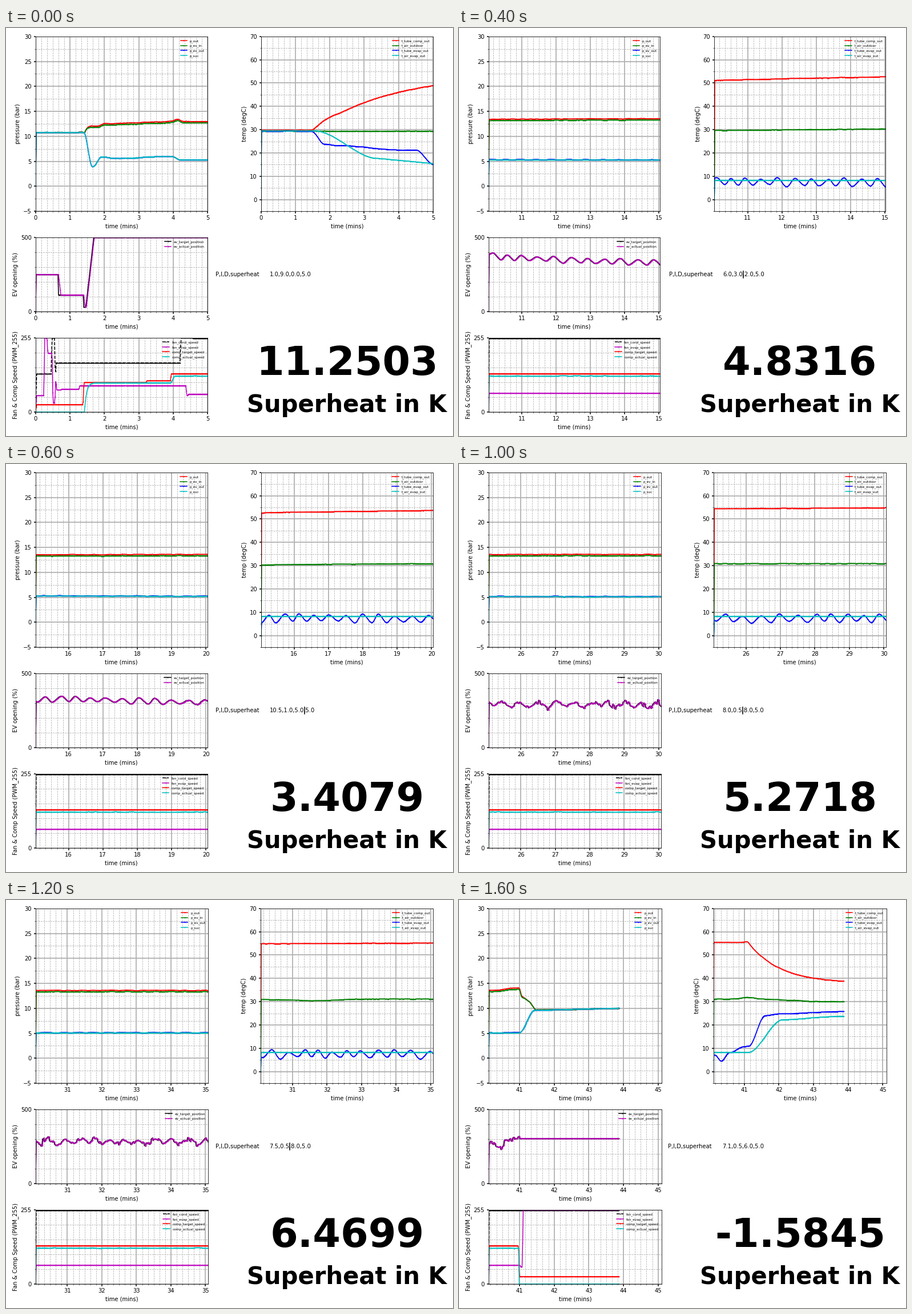
Animation of 783x715 px, one loop 1.8 s. Source, as a matplotlib script:

```python
import numpy as np
import matplotlib.pyplot as plt
from matplotlib.animation import FuncAnimation
from matplotlib.ticker import MultipleLocator

W, H, DPI = 783, 715, 72
SPAN, STRIDE, END = 5.0, 5.0134, 43.89      # window, step and log end, minutes
STOP = 41.0                                 # the compressor shuts down here
# (superheat, controller settings, caret index)
READINGS = [("11.2503", "1.0,9.0,0.0,5.0", None),
            ("7.4167", "1.5,9.0,0.0,5.0", 3),
            ("4.8316", "6.0,3.0,2.0,5.0", 7),
            ("3.4079", "10.5,1.0,5.0,5.0", 12),
            ("5.9240", "8.5,1.0,8.0,5.0", 5),
            ("5.2718", "8.0,0.5,8.0,5.0", 7),
            ("6.4699", "7.5,0.5,8.0,5.0", 7),
            ("4.6053", "7.1,0.5,6.0,5.0", None),
            ("-1.5845", "7.1,0.5,6.0,5.0", None)]

plt.rcParams.update({"font.family": "DejaVu Sans", "font.size": 10})


# ---------- building blocks ----------
def line(t, a, b):
    return np.clip((t - a) / (b - a), 0, 1)


def ease(t, a, b):
    s = line(t, a, b)
    return s * s * (3 - 2 * s)


def rise(t, start, tau):
    return 1 - np.exp(-np.maximum(t - start, 0) / tau)


def bump(t, center, width):
    return np.exp(-((t - center) / width) ** 2)


def keys(t, pairs, eased=False):
    """Join (time, value) pairs with straight or eased segments."""
    x, y = np.array(pairs, float).T
    if not eased:
        return np.interp(t, x, y)
    i = np.clip(np.searchsorted(x, t, "right") - 1, 0, len(x) - 2)
    return y[i] + (y[i + 1] - y[i]) * ease(t, x[i], x[i + 1])


def levels(t, pairs, ramp=.025):
    """Hold each level from its start time, after a short ramp."""
    out, last = 0 * t, 0
    for start, level in pairs:
        out = out + (level - last) * line(t, start, start + ramp)
        last = level
    return out


def swings():
    """Turning points of the evaporator temperature while it hunts."""
    rng = np.random.default_rng(4)
    t, high, out = 6.23, False, []
    while t < 40:
        if t < 9.8:
            out.append((t, 11.4 if high else 5.4))
            t += .43
        else:
            out.append((t, (8.9 if high else 5.9) + rng.uniform(-.6, .6)))
            t += rng.uniform(.17, .29)
        high = not high
    return out


TUBE = ([(0, 29.4), (1.46, 29.4), (1.85, 23.8), (2.2, 23.2), (4.2, 21.2),
         (4.5, 21.3), (5.02, 15.1), (5.5, 11.3), (5.7, 10.9)] + swings()
        + [(40.15, 7.1), (40.33, 4.5), (40.58, 8.3), (41, 10.7), (41.13, 11),
           (41.6, 24), (42, 24.8), (43.9, 25.8)])


def tube_temp(t):
    return keys(t, TUBE, eased=True)


# ---------- traces ----------
def pressures(t, rough):
    high = (10.8 + 1.3 * rise(t, 1.43, .06) + .4 * ease(t, 1.8, 2)
            + .5 * line(t, 2, 4) + .45 * bump(t, 4.12, .12)
            + .6 * rise(t, 5, 4) + .5 * ease(t, 40.2, STOP))
    fall = keys(t, [(41, 14.1), (41.06, 12.5), (41.3, 11.2), (41.46, 9.65),
                    (43.9, 10.05)])
    high = np.where(t < STOP, high, fall) + rough(.03)
    drop = .27 * ease(t, 1.43, 1.6) * (1 - ease(t, STOP, 41.2))

    hunting = (t > 5.8) & (t < 10)
    low = (10.8 - 6.85 * ease(t, 1.40, 1.65) + 1.95 * ease(t, 1.67, 1.92)
           - .3 * ease(t, 1.92, 2.3) + .35 * ease(t, 2.5, 3.6)
           - .65 * ease(t, 3.97, 4.2) - .2 * ease(t, 8, 35)
           + .2 * hunting * np.cos(2 * np.pi * (t - 6.87) / .88)
           + 4.5 * ease(t, 40.99, 41.43) + .45 * line(t, 41.4, 43.9))
    low = low + rough(.015)
    steady = (t > 10) & (t < STOP)
    ev_out = low + steady * np.clip(.03 * (tube_temp(t) - 6), 0, .12)
    return [high, high - drop, ev_out, low]


def temperatures(t, rough):
    comp = np.where(t < 5, 29.8 + 24 * rise(t, 1.5, 2.2) + .8 * bump(t, 1.9, .3),
                    48.9 + 6.9 * rise(t, 5, 12.5) + .3 * bump(t, 41.05, .1))
    comp = np.where(t < 41.1, comp, 38 + 17.7 * np.exp(-(t - 41.1) / .9))
    outdoor = (29.4 + 1.5 * ease(t, 6, 21) - .45 * bump(t, 31.7, .7)
               + .25 * ease(t, 32, 33) + .7 * bump(t, 41.1, .25)
               - 1.1 * ease(t, 41.2, 43.5))
    air = np.where(t < 5, 29.5 - 11.8 * ease(t, 1.55, 3.4) - 2.2 * line(t, 3.4, 5),
                   8.3 + 7.1 * np.exp(-(t - 5) / 1.15))
    air = air + 13.9 * ease(t, 41.12, 42.1) + 1.6 * ease(t, 41.9, 43.9)
    return [comp + rough(.04), outdoor + rough(.04),
            tube_temp(t) + rough(.04), air + rough(.02)]


def valve(t, rng):
    startup = keys(t, [(0, 250), (.65, 250), (.66, 113), (1.39, 113), (1.4, 30),
                       (1.46, 30), (1.69, 500)])
    gain = np.interp(t, [9.5, 11], [18, 11])
    hunt = (275 + 138 * np.exp(-(t - 6) / 10)
            + gain * (tube_temp(t - .05) - 7.5))
    noise = np.interp(t, [18, 25, 30], [0, 6, 8]) + 10 * bump(t, 30.3, .25)
    hunt = hunt + noise * np.repeat(rng.normal(0, 1, len(t)), 3)[:len(t)]
    hunt = np.where(t < STOP, hunt, 304)
    target = np.where(t < 5, startup, 500 + (hunt - 500) * ease(t, 5.78, 6.2))

    # the motor trails the command at a limited speed
    actual = target.copy()
    for i in range(1, len(t)):
        actual[i] = actual[i - 1] + np.clip(target[i - 1] - actual[i - 1], -34, 34)
    return [target, actual]


def speeds(t, rough):
    cond = levels(t, [(0, 131), (.45, 255), (.55, 106), (.57, 169), (4.2, 255),
                      (4.55, 252)])
    evap = levels(t, [(0, 57), (.24, 255), (.33, 202), (.48, 32), (.56, 110),
                      (.59, 76), (.73, 79), (1.26, 91), (4.37, 57), (4.42, 62),
                      (8.96, 107), (9.03, 65), (41.01, 60), (41.08, 255)])
    command = levels(t, [(0, 26), (1.38, 102), (3.21, 108), (3.92, 132),
                         (40.97, 26)])
    actual = 101 * rise(t, 1.42, .06) + 23 * ease(t, 3.92, 4.05)
    actual = actual + (t > 4.4) * rough(.5)
    return [cond, evap, command, np.where(t < 40.99, actual, 0)]


def signals(t, seed):
    rng = np.random.default_rng(seed)

    def rough(amp, width=9):
        raw = rng.normal(0, amp, len(t) + width - 1)
        return np.convolve(raw, np.ones(width), "valid") / np.sqrt(width)

    return [pressures(t, rough), temperatures(t, rough), valve(t, rng),
            speeds(t, rough)]


# ---------- figure ----------
fig = plt.figure(figsize=(W / DPI, H / DPI), dpi=DPI, facecolor="white")
grid = fig.add_gridspec(4, 2)


def chart(cell, ylabel, ylim, major, minor, names, colors):
    ax = fig.add_subplot(cell)
    ax.set(xlabel="time (mins)", ylabel=ylabel, ylim=ylim)
    ax.xaxis.set_major_locator(MultipleLocator(1))
    ax.xaxis.set_minor_locator(MultipleLocator(1 / 6))
    ax.yaxis.set_major_locator(MultipleLocator(major))
    ax.yaxis.set_minor_locator(MultipleLocator(minor))
    ax.grid(which="major", lw=1.75)
    ax.grid(which="minor", ls="--", lw=.8)
    ax.tick_params(which="major", width=1.5)
    traces = [ax.plot([], [], "--" if name == "fan_cond_speed" else "-", color=c,
                      lw=1.5, marker=".", ms=1.5, label=name)[0]
              for name, c in zip(names.split(), colors)]
    ax.legend(loc="upper right", fontsize="xx-small", frameon=False)
    return ax, traces


charts = [
    chart(grid[:2, 0], "pressure (bar)", (-5, 30), 5, 2.5,
          "p_out p_ev_in p_ev_out p_suc", "rgbc"),
    chart(grid[:2, 1], "temp (degC)", (-5, 70), 10, 5,
          "t_tube_comp_out t_air_outdoor t_tube_evap_out t_air_evap_out", "rgbc"),
    chart(grid[2, 0], "EV opening (%)", (0, 500), 500, 100,
          "ev_target_position ev_actual_position", "km"),
    chart(grid[3, 0], "Fan & Comp Speed (PWM_255)", (0, 255), 255, 51,
          "fan_cond_speed fan_evap_speed comp_target_speed comp_actual_speed",
          "kmrc"),
]

entry = fig.add_subplot(grid[2, 1])
entry.axis("off")
entry.set(xlim=(0, 1), ylim=(0, 1))
entry.text(-.01, .5, "P,I,D,superheat", ha="right", va="center")
setting = entry.text(.05, .5, "", va="center")
caret, = entry.plot([], [], "k", lw=1.5)

display = fig.add_subplot(grid[3, 1])
display.axis("off")
number = display.text(.5, .5, "", size=70, weight="bold", ha="center")
display.text(.5, 0, "Superheat in K", size=41.7, weight="bold", ha="center")


def place_caret(text, index):
    caret.set_visible(index is not None)
    if index is not None:
        offset = sum(6.36 if ch.isdigit() else 3.18 for ch in text[:index])
        x = .05 + (offset + .5) / (entry.get_position().width * W)
        caret.set_data([x, x], [.455, .545])


def draw(k):
    start = k * STRIDE
    t = start + np.linspace(0, SPAN, 301)
    t = t[t <= END]
    for (ax, traces), data in zip(charts, signals(t, 40 + k)):
        ax.set_xlim(start, start + SPAN)
        for trace, y in zip(traces, data):
            y[0] = 0            # every log buffer opens with a zero
            trace.set_data(t, y)

    value, text, index = READINGS[k]
    number.set_text(value)
    setting.set_text(text)
    for _ in range(3):          # margins depend on widths, so let them settle
        fig.tight_layout()
    place_caret(text, index)
    return []


anim = FuncAnimation(fig, draw, frames=len(READINGS), interval=200,
                     init_func=lambda: draw(0), repeat=True, repeat_delay=0)
plt.show()
```
